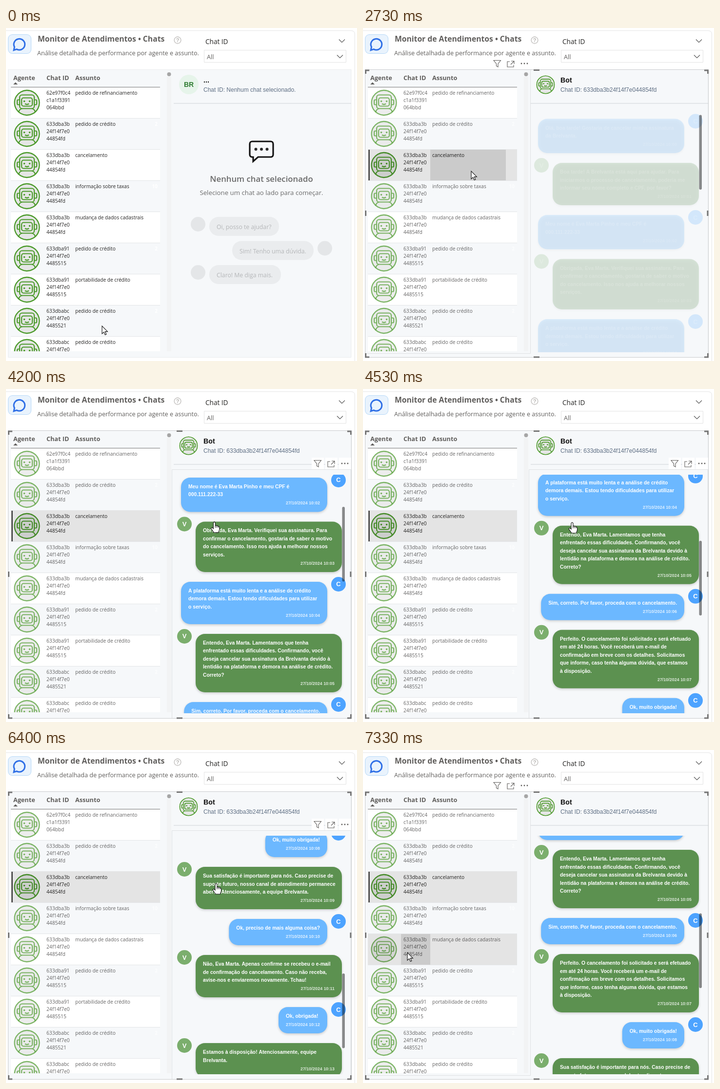
Write an HTML page with a canvas that moves like this. It is 720 px wide and 684 px high and loops after 8000 ms.

```html
<!DOCTYPE html>
<html lang="pt">
<head>
<meta charset="utf-8">
<title>Monitor de Atendimentos</title>
<style>
  html, body { margin: 0; width: 100%; height: 100%; overflow: hidden; background: #fff; }
  canvas { display: block; width: 720px; height: 684px; }
</style>
</head>
<body>
<canvas id="stage" width="720" height="684"></canvas>
<script>
const ctx = document.getElementById('stage').getContext('2d');
const LOOP = 8000, TICK = 1000 / 15;
const PANE = '#f6f8fa', GREEN = '#4b9a2a';
const VIEW = { top: 176, bottom: 666 };
const ROW = { top: 122, height: 64, left: 10, right: 316, bottom: 664 };
const COLUMNS = [10, 78, 138, 293, 316];

const sans = (px, weight = 400) => `${weight} ${px}px "Open Sans", sans-serif`;
const arial = (px, weight = 400) => `${weight} ${px}px "Liberation Sans", Arial, sans-serif`;

// Agent table: chat ID in three lines, subject, hidden count
const rows = [
  ['62e97f0c4 c1a1f3391 064bbd', 'pedido de refinanciamento', '1'],
  ['633dba3b 24f14f7e0 44854fd', 'pedido de crédito', '2'],
  ['633dba3b 24f14f7e0 44854fd', 'cancelamento', '1'],
  ['633dba3b 24f14f7e0 44854fd', 'informação sobre taxas', '10'],
  ['633dba3b 24f14f7e0 44854fd', 'mudança de dados cadastrais', '1'],
  ['633dba91 24f14f7e0 4485515', 'pedido de crédito', '2'],
  ['633dba91 24f14f7e0 4485515', 'portabilidade de crédito', '1'],
  ['633dbabc 24f14f7e0 4485521', 'pedido de crédito', '2'],
  ['633dbabc 24f14f7e0 4485521', 'pedido de crédito', '1'],
];

// Client and agent take turns, one message a minute
const messages = [
  'Olá, boa tarde! Gostaria de cancelar minha assinatura|da Brelvanta.',
  'Boa tarde! A Brelvanta está aqui para ajudar. Para|iniciarmos o processo de cancelamento, poderia me|informar seu nome completo e CPF, por favor?',
  'Meu nome é Eva Marta Pinho e meu CPF é|000.111.222-33',
  'Obrigada, Eva Marta. Verifiquei sua assinatura. Para|confirmar o cancelamento, gostaria de saber o motivo|do cancelamento. Isso nos ajuda a melhorar nossos|serviços.',
  'A plataforma está muito lenta e a análise de crédito|demora demais. Estou tendo dificuldades para utilizar|o serviço.',
  'Entendo, Eva Marta. Lamentamos que tenha|enfrentado essas dificuldades. Confirmando, você|deseja cancelar sua assinatura da Brelvanta devido à|lentidão na plataforma e demora na análise de crédito.|Correto?',
  'Sim, correto. Por favor, proceda com o cancelamento.',
  'Perfeito. O cancelamento foi solicitado e será efetuado|em até 24 horas. Você receberá um e-mail de|confirmação em breve com os detalhes. Solicitamos|que informe, caso tenha alguma dúvida, que estamos|à disposição.',
  'Ok, muito obrigada!',
  'Sua satisfação é importante para nós. Caso precise de|suporte futuro, nosso canal de atendimento permanece|aberto. Atenciosamente, a equipe Brelvanta.',
  'Ok, preciso de mais alguma coisa?',
  'Não, Eva Marta. Apenas confirme se recebeu o e-mail|de confirmação do cancelamento. Caso não receba,|avise-nos e enviaremos novamente. Tchau!',
  'Ok, obrigada!',
  'Estamos à disposição! Atenciosamente, equipe|Brelvanta.',
].map(m => m.split('|'));

// Keys: time, then values
const pointerKeys = [
  [0, 197, 612], [200, 201, 565], [467, 210, 365], [667, 214, 310], [800, 214, 310], [933, 222, 294],
  [3333, 222, 294], [3533, 426, 272], [3933, 426, 272], [4533, 429, 274], [4667, 431, 274],
  [6867, 431, 274], [7200, 111, 411], [7333, 91, 416],
];
const scrollKeys = [
  [3867, 0], [3933, 24], [4533, 424], [4667, 500], [4933, 500], [5000, 525], [5200, 680], [5267, 700],
  [5667, 700], [5733, 725], [5933, 880], [6000, 900], [6333, 900], [6400, 893], [6900, 525], [7000, 500],
];

const shapes = {
  robot: new Path2D('M-10-16H10a5 5 0 0 1 5 5V7a5 5 0 0 1-5 5H-10a5 5 0 0 1-5-5V-11a5 5 0 0 1 5-5Z' +
    'M-7-10H7a4 4 0 0 1 4 4V3a4 4 0 0 1-4 4H-7a4 4 0 0 1-4-4V-6a4 4 0 0 1 4-4Z' +
    'M-15-6h-3a2 2 0 0 0-2 2v6a2 2 0 0 0 2 2h3M15-6h3a2 2 0 0 1 2 2v6a2 2 0 0 1-2 2h-3' +
    'M-4 2Q0 5 4 2M-17 19Q-15 12-9 12M17 19Q15 12 9 12'),
  arrow: new Path2D('M0 0V16L3.8 12.6 6.3 18.3 8.8 17.2 6.3 11.6H11.4Z'),
  hand: new Path2D('M-2 2Q0-2 2 2V8Q4 6.6 5 8.3 7 7.4 8 9.2 10.5 9 10.5 12V16L8.5 22H-1L-6.5 14Q-7 11-4 12L-2 14Z'),
  funnel: new Path2D('M-7-6.5H7.5L2 .5V7L-1.5 5V.5Z'),
  focus: new Path2D('M-2-4H-7V7H6V3M1-5H7V1M7-5L0 2'),
  chat: new Path2D('M505.500 233H543a5 5 0 0 1 5 5V260a5 5 0 0 1-5 5H517L507 274V265H505a5 5 0 0 1-5-5V238a5 5 0 0 1 5-5Z'),
  badge: new Path2D('M16 45.500L17.400 39A11.300 11.300 0 1 1 22 43.600Z'),
  handles: new Path2D('M5.500 94V87H13M700 87H707.500V94M5.500 668V676H13M700 676H707.500V668' +
    'M350 86.500H362M350 676H362M5.500 375V386M707 375V386'),
};

function track(keys, t) {
  const next = keys.findIndex(k => k[0] > t);
  if (next === 0) return keys[0].slice(1);
  if (next < 0) return keys[keys.length - 1].slice(1);
  const a = keys[next - 1], b = keys[next], u = (t - a[0]) / (b[0] - a[0]);
  return a.slice(1).map((v, i) => v + (b[i + 1] - v) * u);
}

function text(s, x, y, font, color, align = 'left') {
  ctx.font = font;
  ctx.fillStyle = color;
  ctx.textAlign = align;
  ctx.fillText(s, x, y);
}
function box(x, y, w, h, color, radius = 0) {
  ctx.fillStyle = color;
  ctx.beginPath();
  ctx.roundRect(x, y, w, h, radius);
  ctx.fill();
}
function disc(x, y, r, color) {
  ctx.fillStyle = color;
  ctx.beginPath();
  ctx.arc(x, y, r, 0, 7);
  ctx.fill();
}
function stroke(path, color, width = 1) {
  ctx.strokeStyle = color;
  ctx.lineWidth = width;
  ctx.stroke(typeof path === 'string' ? new Path2D(path) : path);
}
function at(x, y, paint, scale = 1) {
  ctx.save();
  ctx.translate(x, y);
  ctx.scale(scale, scale);
  paint();
  ctx.restore();
}
function clipped(x, y, w, h, paint) {
  ctx.save();
  ctx.beginPath();
  ctx.rect(x, y, w, h);
  ctx.clip();
  paint();
  ctx.restore();
}

function robot(x, y, scale) {
  at(x, y, () => {
    disc(0, 0, 25.5, '#e5e6e5');
    stroke('M25.500 0A25.500 25.500 0 1 1 25.500-.01Z', GREEN, 2.3);
    stroke(shapes.robot, GREEN, 2.2);
    for (const side of [-1, 1]) disc(side * 5.5, -3, 1.8, GREEN);
  }, scale);
}

function toolbar(x, y) {
  for (let i = 0; i < 3; i++) box(x - 12 + i * 28, y - 12, 25, 24, '#fff');
  at(x, y, () => stroke(shapes.funnel, '#605e5c', 1.1));
  at(x + 28, y, () => stroke(shapes.focus, '#605e5c', 1.1));
  for (let i = -1; i < 2; i++) disc(x + 56 + i * 6, y, 1.4, '#605e5c');
}

function pageHeader() {
  stroke('M0 5.500H708Q715.500 5.500 715.500 13V684', '#e4e4e4');
  box(4, 13, 48, 40, '#b5d8f8', 9);
  box(5, 14, 46, 38, '#e9f3fd', 8);
  stroke(shapes.badge, '#2f6fe6', 3);
  text('Monitor de Atendimentos • Chats', 65, 28, sans(15.7, 700), '#605e5c');
  text('Análise detalhada de performance por agente e assunto.', 64, 56, sans(12.57), '#605e5c');
  stroke('M358.800 25A6.800 6.800 0 1 1 358.800 24.990Z', '#c8c6c4', 1.6);
  text('?', 352, 29, arial(11, 700), '#b8b6b4', 'center');
  text('Chat ID', 409, 33, sans(13.6), '#252423');
  stroke('M406.500 45.500H697.500V70.500H406.500Z', '#e3e3e3');
  text('All', 412, 64, sans(12.6), '#605e5c');
  stroke('M683 23.500L689 29.500L695 23.500M679 55.500L685 61.500L691 55.500', '#555', 1.1);
}

function table(selected, hover) {
  box(330, 100, 9, 564, '#f2f3f4');
  disc(334.5, 95, 4, '#a6a6a6');
  const titles = [['Agente', 15], ['Chat ID', 83], ['Assunto', 142]];
  for (const [s, x] of titles) text(s, x, 107, sans(12.65, 700), '#605e5c');
  ctx.fillStyle = '#605e5c';
  ctx.fill(new Path2D('M15 116L19.500 111.500L24 116Z'));
  box(10, 121, 306, 1, '#777');
  clipped(ROW.left, ROW.top, ROW.right - ROW.left, ROW.bottom - ROW.top, () => {
    rows.forEach(([id, subject, count], i) => {
      const y = ROW.top + i * ROW.height, width = ROW.right - ROW.left;
      box(ROW.left, y, width, ROW.height, i % 2 ? PANE : '#fff');
      box(ROW.left, y + 63, width, 1, '#e3e5e7');
      ctx.globalAlpha = selected && i !== 2 ? 0.7 : 1;
      robot(43, y + 31.5);
      id.split(' ').forEach((part, n) => text(part, 83, y + 15 + n * 15, sans(10.2), '#252423'));
      text(subject, 142, y + 15, sans(10.1), '#252423');
      text(count, 311, y + 15, sans(10, 700), '#fff', 'right');
      ctx.globalAlpha = 1;
      const isSelected = selected && i === 2;
      if (isSelected || hover?.row === i) box(ROW.left, y, width, 63, 'rgba(0,0,0,.105)');
      if (hover?.row === i && hover.column > 0) {
        const left = COLUMNS[hover.column];
        box(left, y, COLUMNS[hover.column + 1] - left, 63, 'rgba(0,0,0,.11)');
      }
      if (isSelected) box(11.5, y, 2, 63, '#111');
    });
  });
}

function emptyChat() {
  stroke(shapes.chat, '#111', 3.2);
  for (const x of [512.5, 524, 535.5]) disc(x, 249, 3, '#2a2a2a');
  text('Nenhum chat selecionado', 524, 316, sans(16.8, 600), '#6a6a6a', 'center');
  text('Selecione um chat ao lado para começar.', 524, 343, sans(13.25), '#6a6a6a', 'center');
  const samples = [
    ['Oi, posso te ajudar?', 394, 417, 143],
    ['Sim! Tenho uma dúvida.', 654, 464, 167],
    ['Claro! Me diga mais.', 394, 417, 147],
  ];
  samples.forEach(([s, dot, x, w], i) => {
    const y = 388 + i * 49.5;
    disc(dot, y + 15, 15, '#e4e6e8');
    box(x, y, w, 39, '#eaecee', 19);
    text(s, x + 15, y + 25, sans(12.25), '#b4b6b8');
  });
}

function bubble(lines, index, top, height) {
  const client = index % 2 === 0, font = arial(10.3, 700);
  ctx.font = font;
  const width = lines.length > 1 ? 300 : Math.max(100, ctx.measureText(lines[0]).width + 30);
  const left = client ? 659 - width : 389;
  disc(client ? 682 : 366, top + 5, 15, client ? '#4da3ff' : '#7bae6d');
  text(client ? 'C' : 'V', client ? 682 : 366, top + 9.5, arial(13, 700), '#fff', 'center');
  ctx.save();
  ctx.shadowColor = 'rgba(0,0,0,.18)';
  ctx.shadowBlur = 5;
  ctx.shadowOffsetY = 2;
  box(left, top, width, height, client ? '#6cb8ff' : '#5c9150', 19);
  ctx.restore();
  lines.forEach((line, n) => text(line, left + 15, top + 22 + n * 16.5, font, '#fff'));
  const minute = String(index).padStart(2, '0');
  text('27/10/2024 10:' + minute, left + width - 15, top + height - 15, arial(8.95, 700), 'rgba(255,255,255,.78)', 'right');
}

function conversation(scroll, alpha) {
  clipped(344, VIEW.top, 364, VIEW.bottom - VIEW.top, () => {
    ctx.globalAlpha = alpha;
    let top = VIEW.top + 10.5 - scroll;
    messages.forEach((lines, i) => {
      const height = 37.5 + 16.5 * lines.length;
      if (top < VIEW.bottom + 20 && top + height > VIEW.top - 20) bubble(lines, i, top, height);
      top += height + 20;
    });
    ctx.globalAlpha = 1;
    box(689.5, 178.5 + scroll * 0.314, 5.5, 153.5, 'rgba(0,0,0,.45)', 2.7);
  });
}

function chatPane(loaded, scroll, alpha) {
  box(344, 154, 364, 1.5, '#dcdfe3');
  if (loaded) robot(374.5, 116.5, 0.71);
  else {
    disc(375, 116, 20, '#e6f4ea');
    text('BR', 375, 121, arial(14, 700), '#2f7d32', 'center');
  }
  text(loaded ? 'Bot' : '...', 405, 112, arial(14.2, 700), '#111');
  const id = loaded ? '633dba3b24f14f7e044854fd' : 'Nenhum chat selecionado.';
  text('Chat ID: ' + id, 405, 131, arial(12), '#5f6f84');
  if (loaded) conversation(scroll, alpha);
  else emptyChat();
}

function pointer(x, y, hand) {
  at(x, y, () => {
    const path = hand ? shapes.hand : shapes.arrow;
    ctx.fillStyle = '#fff';
    ctx.fill(path);
    stroke(path, '#111', 1.1);
    if (hand) stroke('M2 8V12M5 8.500V12M8 9.500V12', '#111');
  });
}

function draw(now) {
  const t = Math.floor((now % LOOP + 4) / TICK) * TICK + 0.01;
  const [x, y] = track(pointerKeys, t), [scroll] = track(scrollKeys, t);
  const selected = t >= 2000, loaded = t >= 2730;
  const overChat = x > 340, overTable = !overChat && t > 60;
  const hover = overTable && {
    row: Math.floor((y - ROW.top) / ROW.height),
    column: COLUMNS.findIndex((c, i) => x >= c && x < COLUMNS[i + 1]),
  };

  ctx.fillStyle = '#fff';
  ctx.fillRect(0, 0, 720, 684);
  pageHeader();
  box(5, 85, 703, 592, PANE);
  stroke('M4.500 85.500H708M4.500 85V676.500H708V85', '#eaecee');
  table(selected, hover);
  chatPane(loaded, scroll, Math.min(1, (t - 2667) / 333));

  if (overTable) {
    stroke('M4.500 85.500H343.500V668.500H4.500Z', '#dfe1e3');
    toolbar(275, 73);
  }
  if (overChat) {
    stroke('M340.500 165.500H707.500V676.500H340.500Z', '#dfe1e3');
    toolbar(639, 153);
  }
  if (selected) {
    stroke('M4.500 85.500H708.500V676.500H4.500Z', '#c9cbcd');
    stroke(shapes.handles, '#777', 3);
  }
  pointer(x, y, overChat);
  requestAnimationFrame(() => draw(performance.now() - start));
}

const start = performance.now();
draw(0);
</script>
</body>
</html>
```
